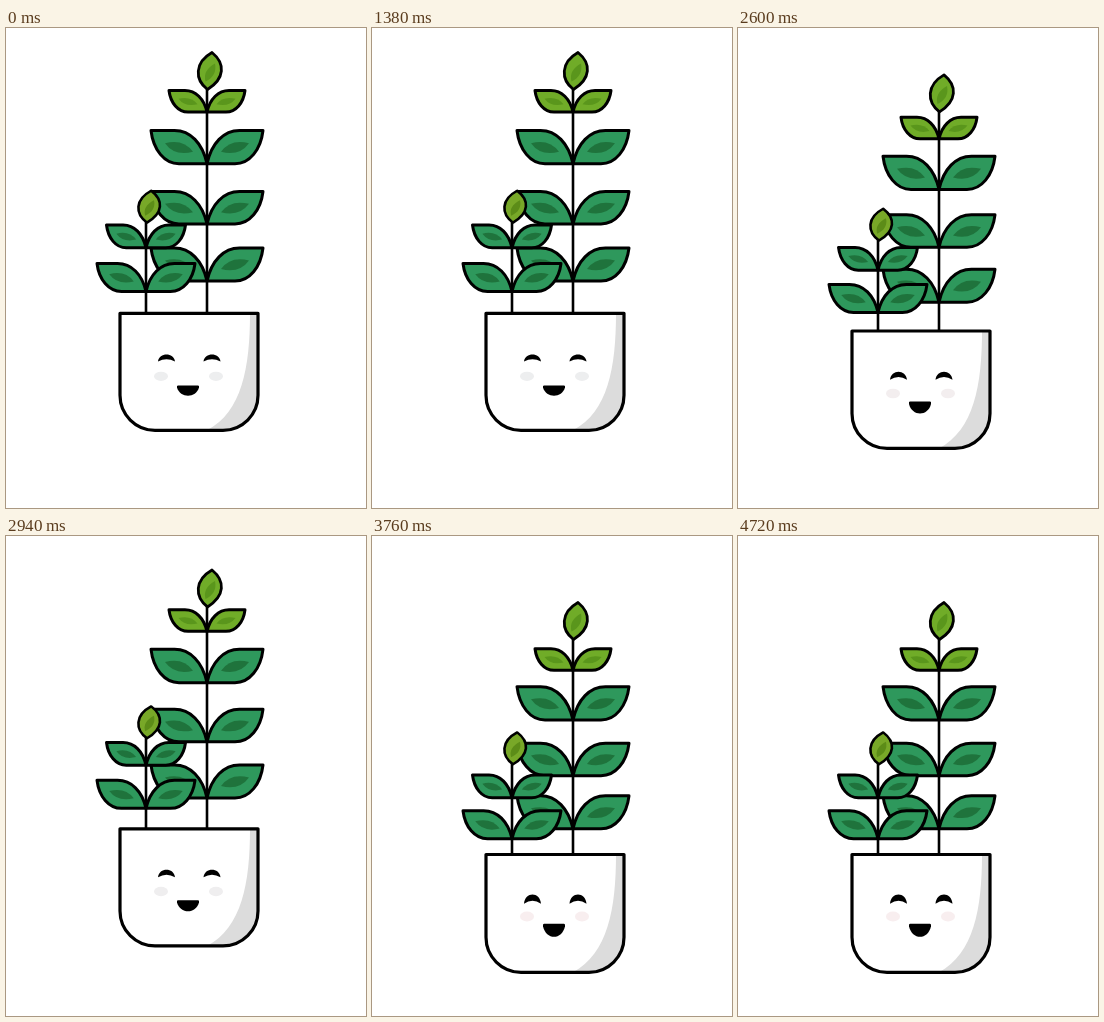
Animation of 360x480 px, one loop 5140 ms. Source, as an HTML page with a canvas:

```html
<!DOCTYPE html>
<html>
<head>
<meta charset="utf-8">
<style>
html, body { margin: 0; width: 100%; height: 100%; overflow: hidden; background: #fff; }
canvas { display: block; }
</style>
</head>
<body>
<canvas id="stage" width="360" height="480"></canvas>
<script>
const ctx = document.getElementById('stage').getContext('2d');
const LOOP = 5140, FALL = 420, RISE = 350;
const peaks = [0, 1380, 2780, 4180];
const GREEN = ['#2e985c', '#1f733c'], LIME = ['#70ac28', '#5a961c'], OLIVE = ['#78a828', '#5c8c18'];

// Each tier: centre x, top y, half width, height, drop at the lowest pose, colours
const tallTiers = [
  [201, 220, 56, 33, 39.8, GREEN],
  [201, 163.5, 56, 32.5, 43.7, GREEN],
  [201, 102.5, 56, 33.3, 48.2, GREEN],
  [201, 62.5, 38, 21.5, 50.3, LIME]
];
const shortTiers = [
  [140, 235.5, 49, 28, 39.2, GREEN],
  [140, 197, 39.5, 22.8, 42, GREEN]
];

function ease(u) {
  u = Math.max(0, Math.min(1, u));
  return u < 0.5 ? 4 * u ** 3 : 1 - 4 * (1 - u) ** 3;
}

// 0 = highest pose, 1 = lowest pose
function lowness(t) {
  const k = peaks.findLastIndex(p => t >= p);
  const down = ease((t - peaks[k]) / FALL);
  if (k === 3 || t < 1320) return down;
  return down - ease((t - peaks[k + 1] + RISE) / RISE);
}

function shape(d, fill, line) {
  const path = new Path2D(d);
  if (fill) {
    ctx.fillStyle = fill;
    ctx.fill(path);
  }
  if (line) {
    ctx.lineWidth = line;
    ctx.stroke(path);
  }
}

function at(x, y, draw, sx = 1, sy = 1) {
  ctx.save();
  ctx.translate(x, y);
  ctx.scale(sx, sy);
  draw();
  ctx.restore();
}

function leaf(w, h, [fill, vein]) {
  shape(`M${-w},0H${-w * .58}C${-w * .3},0 ${-w * .08},${h * .38} 0,${h}
    H${-w * .5}C${-w * .76},${h} ${-w * .96},${h * .58} ${-w},0Z`, fill, 3);
  shape(`M${-w * .75},${h * .38}Q${-w * .42},${h * .24} ${-w * .25},${h * .64}
    Q${-w * .58},${h * .78} ${-w * .75},${h * .38}Z`, vein);
}

function tier([x, y, w, h, drop, colours], s) {
  for (const side of [1, -1]) at(x, y + drop * s, () => leaf(w, h, colours), side);
}

function bud(x, y, sx, sy, [fill, vein]) {
  at(x, y, () => {
    shape('M4.5,0C18,11 17.5,26 0,37C-13,27 -13,10 4.5,0Z', fill, 2.8);
    shape('M7.5,11Q10,23 -2,29Q-5,18 7.5,11Z', vein);
  }, sx, sy);
}

function stem(x, top, bottom) {
  shape(`M${x},${top}V${bottom}`, null, 2.6);
}

function pot(s) {
  const floor = 117 + s * .8, bend = floor - 35;
  const outline = `M114,0H252V${bend}A35,35 0 0 1 217,${floor}H149A35,35 0 0 1 114,${bend}Z`;
  shape(outline, '#fff');
  shape(`M244,0C244,54 236,99 201,${floor}H217A35,35 0 0 0 252,${bend}V0Z`, '#dcdcdc');
  shape(outline, null, 3.2);

  const tint = Math.round(237 + s * 11);
  ctx.fillStyle = `rgb(${tint},238,239)`;
  for (const x of [155, 210]) {
    ctx.beginPath();
    ctx.ellipse(x, 63 - s, 7, 4.6 + s * .4, 0, 0, 7);
    ctx.fill();
  }

  for (const x of [160.5, 206]) {
    at(x, 41 - s * 1.3, () =>
      shape('M-8.5,7.2C-7.5,-2 7.5,-2 8.5,7.2Q0,2.5 -8.5,7.2Z', '#000'), 1, 1 + s * .33);
  }
  at(182, 72.2 - s * 3, () =>
    shape('M-10,0H10Q11.5,0 11,2C8,13 -8,13 -11,2Q-11.5,0 -10,0Z', '#000'), 1, 1 + s * .28);
}

function frame(now) {
  const s = lowness(now % LOOP);
  const rim = 285.3 + 33.2 * s;
  ctx.fillStyle = '#fff';
  ctx.fillRect(0, 0, 360, 480);
  ctx.strokeStyle = '#000';
  ctx.lineJoin = 'round';

  const tallTip = 24.5 + 42 * s, shortTip = 162.8 + 33.6 * s;
  stem(201, tallTip + 36, rim);
  tallTiers.forEach(t => tier(t, s));
  bud(201.5, tallTip, 1, 1, LIME);
  stem(140, shortTip + 30, rim);
  shortTiers.forEach(t => tier(t, s));
  bud(141, shortTip, .93, .86, OLIVE);
  at(0, rim, () => pot(s));
  requestAnimationFrame(frame);
}
requestAnimationFrame(frame);
</script>
</body>
</html>
```
